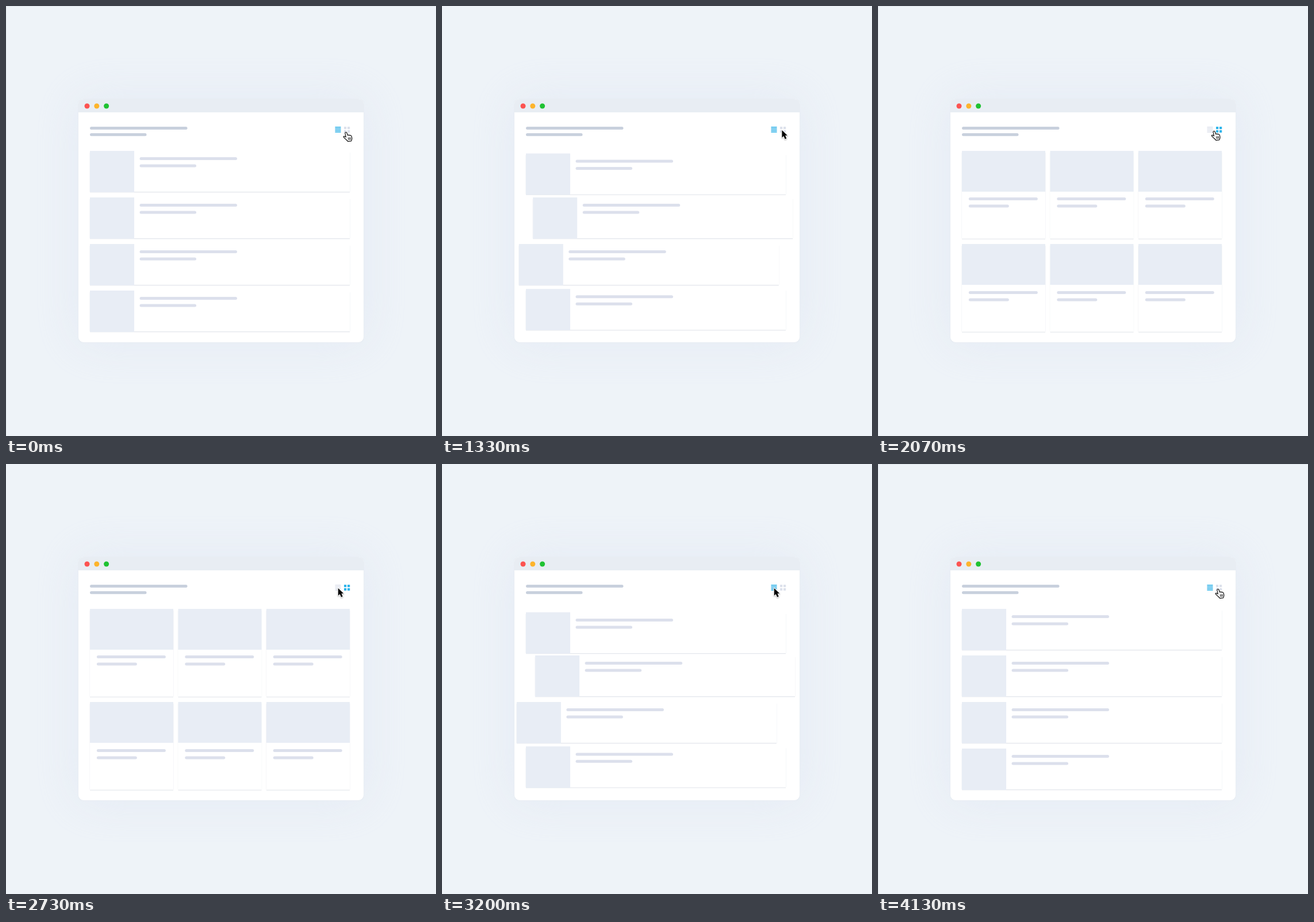
An HTML page with a canvas that plays this animation: 748 by 748 pixels, repeating every 4190 ms.

```html
<!DOCTYPE html>
<html lang="en">
<head>
<meta charset="utf-8">
<title>List and grid switch</title>
<style>
  html, body { margin: 0; width: 100%; height: 100%; overflow: hidden; background: #eef3f8; }
  canvas { display: block; width: 748px; height: 748px; }
</style>
</head>
<body>
<canvas id="stage" width="748" height="748"></canvas>
<script>
const ctx = document.getElementById('stage').getContext('2d');
const LOOP = 4190, STEP = 200 / 3;
const SWITCH = 562, TO_GRID = 1072, TO_LIST = 2733;
const BLUE = '#2fb5eb', IDLE = '#dde1ec', THUMB = '#e8edf5', BAR = '#dce0ec';

// Travel of each list row and grid card when it is fully out
const rowOut = [[0, -175], [-474, 0], [474, 0], [0, 109]];
const cardOut = [[-211, 0], [0, -295], [214, 0], [-211, 0], [0, 215], [214, 0]];

const arrow = new Path2D('M0 0V13L3 10.2L5.2 15.6L7.9 14.5L5.7 9.2H9.5Z');
const hand = new Path2D('M4.2 1C5.2.5 6.2 1 6.6 2.2L8 6.2C8.6 5.4 9.8 5.4 10.3 6.2C11 5.5 12 5.6 12.4 6.5' +
  'C13.4 6.2 14.4 6.7 14.7 7.9L15.4 11C15.7 13 14.8 14.4 14.2 16L8.2 16.8C7.4 15 5 13.6 3.2 11.6' +
  'C2 10.4.6 9.6.7 8.6C.9 7.4 2.6 7.6 3.6 8.4L4.9 9.3L3.5 3C3.3 2 3.5 1.3 4.2 1Z');
const knuckles = new Path2D('M8.9 10.3L9.5 14M10.9 10.1L11.4 13.8M12.8 9.9L13.2 13.5');

const clamp = v => Math.min(1, Math.max(0, v));
const smooth = v => v * v * (3 - 2 * v);
const curve = (s, a, b) => 3 * s * (1 - s) ** 2 * a + 3 * s * s * (1 - s) * b + s ** 3;

// Late, steep ease that pulls back first and overshoots at the end
function swing(t) {
  if (t <= 0) return 0;
  if (t >= 1) return 1;
  let lo = 0, hi = 1;
  for (let i = 0; i < 24; i++) {
    const mid = (lo + hi) / 2;
    if (curve(mid, 1, 0.4) < t) lo = mid; else hi = mid;
  }
  return curve(lo, -0.48, 1.33);
}

function rect(x, y, w, h, color) {
  ctx.fillStyle = color;
  ctx.fillRect(x, y, w, h);
}

function round(x, y, w, h, r, color) {
  ctx.fillStyle = color;
  ctx.beginPath();
  ctx.roundRect(x, y, w, h, r);
  ctx.fill();
}

const bar = (x, mid, w, color = BAR) => round(x, mid - 2.5, w, 5, 2.5, color);

function panel(x, y, w, h, thumbW, thumbH) {
  rect(x, y + h, w, 1.4, '#e5e8ed');
  rect(x + w, y + 3, 0.8, h - 3, '#f4f5f8');
  rect(x - 0.8, y + 3, 0.8, h - 3, '#f4f5f8');
  if (thumbW < w) rect(x + thumbW, y, w - thumbW, h, '#fff');
  else rect(x, y + thumbH, w, h - thumbH, '#fff');
  rect(x, y, thumbW, thumbH, THUMB);
}

function drawRows(p) {
  ctx.globalAlpha = clamp(1 - p);
  rowOut.forEach(([dx, dy], i) => {
    const x = 146 + dx * p, y = 252 + 81 * i + dy * p;
    panel(x, y, 452, 71, 77, 72);
    bar(x + 86.5, y + 13.6, 169.5);
    bar(x + 86.5, y + 26, 98.5);
  });
  ctx.globalAlpha = 1;
}

function drawCards(p) {
  ctx.globalAlpha = clamp(p);
  cardOut.forEach(([dx, dy], i) => {
    const line = Math.floor(i / 3);
    const x = 146 + 153.5 * (i % 3) + dx * (1 - p);
    const y = 252 + 162 * line + dy * (1 - p);
    panel(x, y, 145, 152.5, 145, 71);
    bar(x + 11.8, y + 83.5 + line, 120);
    bar(x + 11.8, y + 96 + line, 70);
  });
  ctx.globalAlpha = 1;
}

function drawWindow() {
  ctx.save();
  ctx.shadowColor = 'rgba(216,223,241,.4)';
  ctx.shadowBlur = 80;
  round(126, 162, 496, 423, 9, '#fff');
  ctx.restore();
  round(125.4, 161.6, 497.2, 424.2, 9, '#e7ecf2');
  round(126, 162, 496, 423, 9, '#fff');
  round(126, 162, 496, 23, [9, 9, 0, 0], '#e8edf3');
  ['#fc5350', '#fdb42c', '#1fc232'].forEach((color, i) => {
    ctx.fillStyle = color;
    ctx.beginPath();
    ctx.arc(141 + 16.8 * i, 174, 4.5, 0, 7);
    ctx.fill();
  });
  bar(146, 212.4, 169.5, '#c8d0dd');
  bar(146, 223.8, 98.5, '#c8d0dd');
}

function listIcon(color) {
  for (let i = 0; i < 4; i++) rect(572.5, 210 + 2.8 * i, 10, 1.6, color);
}

function gridIcon(color) {
  for (let i = 0; i < 4; i++) rect(588 + 6 * (i % 2), 210 + 6 * (i >> 1), 4.2, 4.2, color);
}

function drawIcons(p) {
  [[listIcon, 1 - p], [gridIcon, p]].forEach(([icon, on]) => {
    icon(IDLE);
    ctx.globalAlpha = clamp(on);
    icon(BLUE);
    ctx.globalAlpha = 1;
  });
}

function drawCursor(k) {
  const side = smooth(clamp((k - 28) / 6)) - smooth(clamp((k - 55) / 7));
  const pointing = k < 5 || (k >= 31 && k < 41) || k >= 59;
  ctx.save();
  ctx.translate(591.4 - 13.6 * side, 216);
  ctx.lineJoin = ctx.lineCap = 'round';
  if (pointing) {
    const press = Math.max(0, 2 - k);
    ctx.translate(-5, 0.8 + press);
    ctx.fillStyle = '#fff';
    ctx.strokeStyle = '#111';
    ctx.lineWidth = 1.2;
    ctx.fill(hand);
    ctx.stroke(hand);
    ctx.lineWidth = 0.9;
    ctx.stroke(knuckles);
  } else {
    ctx.save();
    ctx.shadowColor = 'rgba(0,0,0,.3)';
    ctx.shadowBlur = 2;
    ctx.shadowOffsetY = 1;
    ctx.strokeStyle = '#fff';
    ctx.lineWidth = 2;
    ctx.stroke(arrow);
    ctx.restore();
    ctx.fillStyle = '#000';
    ctx.fill(arrow);
  }
  ctx.restore();
}

function draw(ms) {
  // The motion is held at fifteen poses a second
  const k = Math.min(62, Math.floor((ms + 3.4) / STEP));
  const t = k * STEP;
  const p = swing((t - TO_GRID) / SWITCH) - swing((t - TO_LIST) / SWITCH);
  rect(0, 0, 748, 748, '#eef3f8');
  if (p === 0 || p === 1) {
    rect(0, 0, 748, 1, '#e2e8ed');
    rect(0, 0, 1, 748, '#e2e8ed');
  }
  drawWindow();
  drawIcons(p);
  if (p < 1) drawRows(p);
  if (p > 0) drawCards(p);
  drawCursor(k);
}

const start = performance.now();
function tick() {
  draw((performance.now() - start) % LOOP);
  requestAnimationFrame(tick);
}
tick();
</script>
</body>
</html>
```
